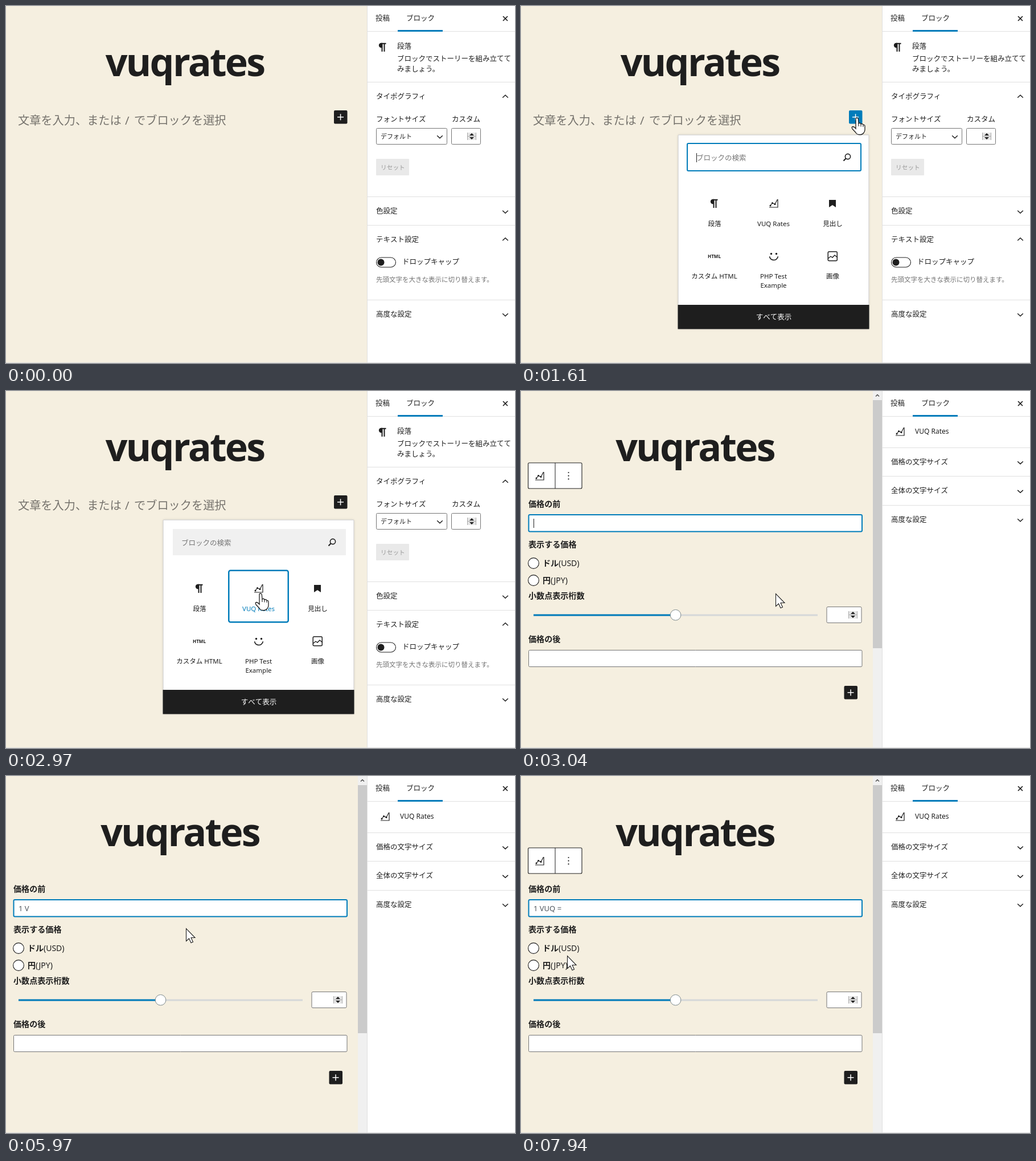
An HTML page with a canvas for the animation above (8000 ms loop, 894 px wide and 626 px high).

```html
<!DOCTYPE html>
<html lang="ja">
<head>
<meta charset="utf-8">
<title>Block editor</title>
<style>
html, body { margin: 0; width: 100%; height: 100%; overflow: hidden; }
canvas { display: block; width: 894px; height: 626px; }
</style>
</head>
<body>
<canvas id="stage" width="894" height="626"></canvas>
<script>
const ctx = document.getElementById('stage').getContext('2d');
const LOOP = 8000;
const INK = '#1e1e1e', BLUE = '#007cba', CREAM = '#f5efe0', GREY = '#757575', RULE = '#e0e0e0';
const SANS = '"Noto Sans", "Noto Sans CJK JP", sans-serif';

// Cursor moves: start, end, number of steps, destination
const MOVES = [
  [240, 1040, 11, 576, 215],
  [1110, 1360, 4, 590, 196],
  [1930, 2720, 11, 447, 355],
  [3450, 3810, 6, 316, 267],
  [7250, 7940, 10, 81, 315]
];
// Field states: time, text, caret visible
const TYPING = [
  [3040, '', 1], [3600, '', 0], [4080, '', 1], [4560, '', 0],
  [4710, '１', 1], [5110, '１', 0], [5590, '1', 1], [5650, '1 ', 1],
  [5970, '1 V', 0], [6050, '1 VU', 1], [6300, '1 VUQ', 1], [6450, '1 VUQ ', 0],
  [6610, '1 VUQ ', 1], [6850, '1 VUQ =', 1], [7020, '1 VUQ =', 0]
];

function rect(x, y, w, h, fill) {
  ctx.fillStyle = fill;
  ctx.fillRect(x, y, w, h);
}

function box(x, y, w, h, fill, stroke, line = 1, radius = 2) {
  const inset = line / 2;
  ctx.beginPath();
  if (stroke) ctx.roundRect(x + inset, y + inset, w - line, h - line, radius);
  else ctx.roundRect(x, y, w, h, radius);
  if (fill) { ctx.fillStyle = fill; ctx.fill(); }
  if (stroke) { ctx.strokeStyle = stroke; ctx.lineWidth = line; ctx.stroke(); }
}

function path(points, { fill, stroke = INK, line = 1.5, close = false } = {}) {
  ctx.beginPath();
  points.forEach(([x, y]) => ctx.lineTo(x, y));
  if (close) ctx.closePath();
  if (fill) { ctx.fillStyle = fill; ctx.fill(); }
  if (stroke) { ctx.strokeStyle = stroke; ctx.lineWidth = line; ctx.stroke(); }
}

function disc(x, y, r, fill, stroke, line = 1) {
  ctx.beginPath();
  ctx.arc(x, y, r, 0, Math.PI * 2);
  if (fill) { ctx.fillStyle = fill; ctx.fill(); }
  if (stroke) { ctx.strokeStyle = stroke; ctx.lineWidth = line; ctx.stroke(); }
}

// Places text by its vertical middle and returns its width
function text(str, x, midY, size = 12.5, { color = INK, weight = 400, align = 'left' } = {}) {
  ctx.font = `${weight} ${size}px ${SANS}`;
  ctx.textAlign = align;
  ctx.fillStyle = color;
  ctx.fillText(str, x, midY + size * 0.38);
  return ctx.measureText(str).width;
}

function at(x, y, draw) {
  ctx.save();
  ctx.translate(x, y);
  draw();
  ctx.restore();
}

function chevron(x, y, dir) {
  path([[x - 4.8, y - 2.2 * dir], [x, y + 2.2 * dir], [x + 4.8, y - 2.2 * dir]]);
}

function pilcrow(x, y) {
  at(x, y, () => {
    ctx.beginPath();
    ctx.arc(-2, -3, 4.2, Math.PI / 2, Math.PI * 1.5);
    ctx.lineTo(0, -7.2);
    ctx.lineTo(0, 1.2);
    ctx.fillStyle = INK;
    ctx.fill();
    rect(-1.5, -7, 2, 15, INK);
    rect(2.5, -7, 2, 15, INK);
    rect(-2, -7.2, 8.5, 2, INK);
  });
}

function chart(x, y) {
  at(x, y, () => {
    const line = [[-6, 4], [-2.5, -0.5], [2, 1.5], [6.5, -7]];
    path(line, { line: 1.2 });
    line.slice(0, 3).forEach(([px, py]) => disc(px, py, 1.5, INK));
    path([[-8, 7], [7, 7], [7, -7]], { line: 1.2 });
  });
}

function plusButton(x, y, fill) {
  box(x, y, 23.5, 23.5, fill);
  rect(x + 6, y + 11, 11, 1.5, '#fff');
  rect(x + 10.8, y + 6.3, 1.5, 11, '#fff');
}

function spinner(x, y) {
  rect(x, y, 16, 13, '#e6e6e6');
  path([[x + 4, y + 5], [x + 8, y + 1], [x + 12, y + 5]], { fill: INK, stroke: null });
  path([[x + 4, y + 8], [x + 8, y + 12], [x + 12, y + 8]], { fill: INK, stroke: null });
  path([[x + 0.5, y], [x + 0.5, y + 13]], { stroke: '#aaa', line: 1 });
  path([[x + 15.5, y], [x + 15.5, y + 13]], { stroke: '#aaa', line: 1 });
  path([[x, y + 6.5], [x + 16, y + 6.5]], { stroke: '#aaa', line: 1 });
}

function heading(centerX) {
  ctx.letterSpacing = '-0.04em';
  ctx.font = `700 68px ${SANS}`;
  ctx.textAlign = 'center';
  ctx.fillStyle = INK;
  ctx.fillText('vuqrates', centerX, 123);
  ctx.letterSpacing = '0px';
}

function sidebarFrame() {
  rect(634, 0, 260, 626, '#fff');
  rect(634, 0, 1, 626, RULE);
  rect(635, 44, 259, 1, RULE);
  rect(688, 42, 79, 3, BLUE);
  text('投稿', 649, 21);
  text('ブロック', 703, 21);
  path([[873, 18], [881, 26]], { line: 1.7 });
  path([[881, 18], [873, 26]], { line: 1.7 });
}

function paragraphSidebar() {
  sidebarFrame();
  [133, 334, 384, 515].forEach(y => rect(635, y, 259, 1, RULE));
  pilcrow(661, 72);
  text('段落', 687, 70);
  text('ブロックでストーリーを組み立てて', 687, 92);
  text('みましょう。', 687, 110);

  text('タイポグラフィ', 650, 158);
  chevron(877, 158.5, -1);
  text('フォントサイズ', 650, 198);
  text('カスタム', 783, 198);
  box(650, 214, 125, 29, '#fff', GREY);
  text('デフォルト', 658, 229, 11);
  chevron(762, 229.5, 1);
  box(782, 214, 52, 29, '#fff', GREY);
  spinner(810, 222);
  box(650, 268, 58, 29, '#e9e9e9', null, 1, 1);
  text('リセット', 658, 282.5, 10.7, { color: '#9a9a9a' });

  text('色設定', 650, 359);
  chevron(877, 361, 1);
  text('テキスト設定', 650, 409);
  chevron(877, 409, -1);
  box(650, 440.5, 35, 18, '#fff', INK, 1.1, 8.5);
  disc(658.5, 449.5, 6, INK);
  text('ドロップキャップ', 696, 448.5);
  text('先頭文字を大きな表示に切り替えます。', 650, 479.5, 11.5, { color: GREY });
  text('高度な設定', 650, 540);
  chevron(877, 541.5, 1);
}

function blockSidebar() {
  sidebarFrame();
  [99, 149, 200].forEach(y => rect(635, y, 259, 1, RULE));
  chart(666, 71);
  text('VUQ Rates', 692, 70.5, 12);
  ['価格の文字サイズ', '全体の文字サイズ', '高度な設定'].forEach((label, i) => {
    text(label, 650, 124 + i * 50.4);
    chevron(877, 125.7 + i * 50.4, 1);
  });
}

function tileLabel(str, x, y, color = INK) {
  text(str, x, y, 11.5, { align: 'center', color });
}

function inserter(t, pointer) {
  const focused = t < 2800;
  const scale = Math.min(1, (t - 1440) / 140);
  ctx.save();
  ctx.translate(443.5, 226);
  ctx.scale(scale, scale);
  ctx.translate(-443.5, -226);

  ctx.shadowColor = 'rgba(0,0,0,.08)';
  ctx.shadowBlur = 5;
  box(275.5, 225.5, 336, 341, '#fff', '#ccc', 1, 1);
  ctx.shadowColor = 'transparent';

  if (focused) box(291, 240, 307, 50, '#fff', BLUE, 2);
  else rect(293, 242, 304, 46, '#f0f0f0');
  text('ブロックの検索', 308, 266, 12.5, { color: GREY });
  if (focused && (t < 2140 || t > 2640)) rect(308, 258, 1, 16, INK);
  disc(574, 264, 4.6, null, INK, 1.6);
  path([[570.7, 267.3], [566.5, 271.5]], { line: 2 });

  const hover = pointer.x > 390 && pointer.x < 497 && pointer.y > 314;
  if (!focused) box(390, 313.5, 107, 93, '#fff', BLUE, 2.5, 3);

  pilcrow(339, 346);
  tileLabel('段落', 340, 381.5);
  chart(444, 346);
  tileLabel('VUQ Rates', 443.5, 381.5, hover ? BLUE : INK);
  path([[541, 340], [553, 340], [553, 353], [547, 349], [541, 353]], { fill: INK, stroke: null });
  tileLabel('見出し', 547.5, 381.5);

  text('HTML', 339.5, 438.5, 8, { weight: 700, align: 'center' });
  tileLabel('カスタム HTML', 339.5, 474);
  disc(439.5, 434.5, 1.7, INK);
  disc(448.5, 434.5, 1.7, INK);
  ctx.beginPath();
  ctx.arc(444, 438, 7.5, 0.15, Math.PI - 0.15);
  ctx.strokeStyle = INK;
  ctx.lineWidth = 1.6;
  ctx.stroke();
  tileLabel('PHP Test', 443.5, 474);
  tileLabel('Example', 443.5, 489.5);
  box(538.5, 430, 17.5, 17.5, '#fff', INK, 1.5);
  path([[539, 443], [544, 439], [547, 441], [551, 437], [556, 441]], { line: 1.4 });
  tileLabel('画像', 547.5, 474);

  rect(275.5, 524, 336, 42.5, INK);
  text('すべて表示', 444, 545, 12.5, { color: '#fff', align: 'center' });
  ctx.restore();
}

function placeholder(str, x) {
  text(str, x, 200.5, 20.2, { color: '#75726c', weight: 300 });
}

function paragraphEditor(t, pointer) {
  heading(314);
  placeholder('文章を入力、または', 21);
  placeholder('/', 209);
  placeholder('でブロックを選択', 225);
  const overPlus = t >= 1110 && pointer.x > 576 && pointer.y < 207;
  plusButton(576, 183, overPlus ? BLUE : INK);
  paragraphSidebar();
  if (t >= 1470) inserter(t, pointer);
}

function label(str, y) {
  text(str, 13, y, 14.1, { weight: 700 });
}

function radio(y, name, code) {
  disc(22, y, 9.4, '#fff', INK, 1.1);
  const width = text(name, 38, y, 14, { weight: 700 });
  text(code, 38 + width, y, 14);
}

function blockEditor(t) {
  heading(305.5);
  rect(618, 0, 16, 626, '#f0f0f0');
  rect(618, 16, 16, 435, '#cbcbcb');
  path([[623, 9.5], [626, 6.5], [629, 9.5]], { stroke: '#505050' });

  if (t < 5970 || t >= 7250) {
    box(12, 125.5, 95.5, 46, '#fff', INK, 1.1);
    rect(59.5, 126, 1, 45, INK);
    chart(33, 149);
    [143, 148.7, 154.4].forEach(y => disc(83.5, y, 1.1, INK));
  }

  label('価格の前', 198);
  box(12.5, 216, 587.5, 31.5, '#fff', BLUE, 2);
  const [, typed, caret] = TYPING.findLast(state => t >= state[0]);
  const width = text(typed, 22, 232, 13, { color: '#50575e' });
  if (caret) rect(Math.round(22 + width), 224, 1, 16, INK);

  label('表示する価格', 268.5);
  radio(302, 'ドル', '(USD)');
  radio(332, '円', '(JPY)');
  label('小数点表示桁数', 359);
  rect(22, 391.5, 499, 3, '#d5d8d9');
  rect(22, 391.5, 250, 3, BLUE);
  disc(271.5, 392.8, 9.3, '#fff', '#7e8a8c');
  box(536.5, 378, 62, 29, '#fff', GREY);
  spinner(575, 386);
  label('価格の後', 435);
  box(13, 454, 586.5, 30, '#fff', GREY);
  plusButton(567.5, 517, INK);
  blockSidebar();
}

function pointerAt(t) {
  let x = 817, y = 578;
  for (const [start, end, steps, toX, toY] of MOVES) {
    if (t < start) break;
    const step = Math.floor((t - start) / (end - start) * (steps - 1) + 0.001) + 1;
    const p = Math.min(1, step / steps);
    const ease = p * p * (3 - 2 * p);
    x += (toX - x) * ease;
    y += (toY - y) * ease;
  }
  return { x, y };
}

function arrow() {
  path([[0.5, 0.5], [0.5, 22.5], [5.5, 18], [9, 25.5], [12.5, 24], [9, 16.5], [16, 16.5]],
    { fill: '#fff', line: 1.1, close: true });
}

function beam() {
  path([[0, -10], [0, 10]], { line: 2 });
  [-11, 11].forEach(y => path([[-7, y], [-1.5, y], [0, y - Math.sign(y)], [1.5, y], [7, y]], { line: 2 }));
}

function hand() {
  const outline = new Path2D('M-2 2Q-2 0 0 0Q2 0 2.3 2L3 10Q6 8 7 11Q10 9.500 11 12.500Q14 11.500 14 15V21Q14 24 11.500 27Q9 30 4 29.500Q0 29.500-2 26L-8 19.500Q-10 16-7 15.500Q-5 15.500-2 19Z');
  ctx.fillStyle = '#fff';
  ctx.fill(outline);
  ctx.strokeStyle = INK;
  ctx.lineWidth = 1.3;
  ctx.stroke(outline);
  path([[3, 10], [3, 15]], { line: 1.1 });
  path([[7, 11], [7, 15.5]], { line: 1.1 });
  path([[11, 13], [11, 16]], { line: 1.1 });
}

function drawPointer(t, { x, y }) {
  let shape = arrow;
  if (t < 1110) shape = x < 634 ? beam : arrow;
  else if (t < 3040) {
    if (y < 207 || y > 314) shape = hand;
    else if (y > 240 && y < 290) shape = beam;
  }
  at(x, y, shape);
}

function render(now) {
  const t = now % LOOP;
  const pointer = pointerAt(t);
  rect(0, 0, 894, 626, CREAM);
  if (t < 3040) paragraphEditor(t, pointer);
  else blockEditor(t);
  rect(0, 625, 894, 1, RULE);
  if (t >= 240) drawPointer(t, pointer);
}

const began = performance.now();
function tick() {
  render(performance.now() - began);
  requestAnimationFrame(tick);
}
tick();
</script>
</body>
</html>
```
